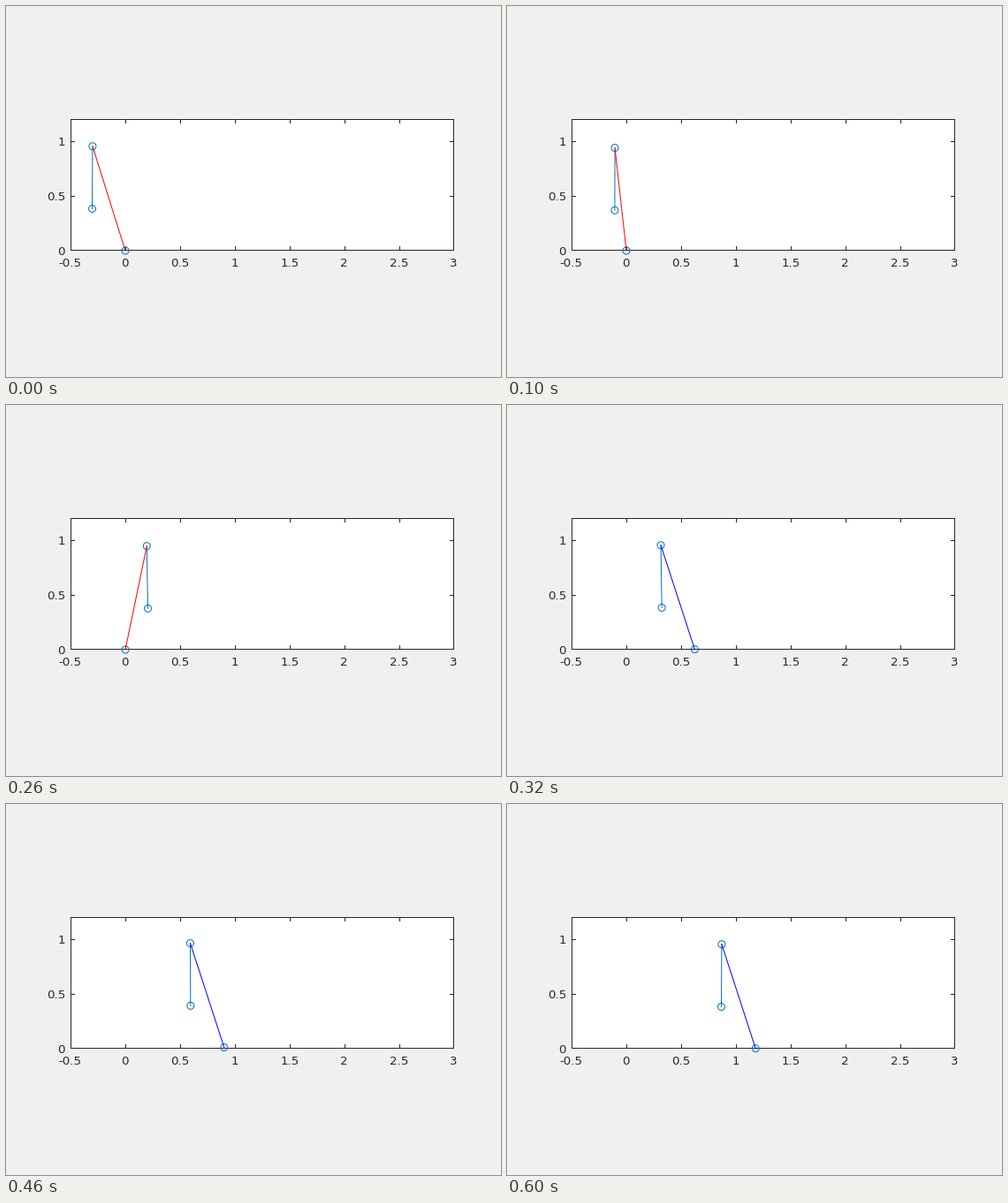
Recreate the animation shown at these times as a matplotlib script. Size 560 by 420 pixels, loop 620 ms.

```python
import math
import matplotlib.pyplot as plt
from matplotlib.animation import FuncAnimation
from matplotlib.patches import Circle

W, H, DPI = 560, 420, 100
PX = 72 / DPI                      # points per pixel
FRAMES, STEP_MS = 31, 20

# Whole numbers: straight strokes snap to the centre of that pixel.
LEFT, RIGHT, TOP, BOTTOM = 73, 506, 128, 276
TICK = 4
INK = "#262626"
STEEL = (0, 0.447, 0.741)

X0, Y0, UNIT = 135.0, 277.0, 124   # ground contact point, pixels per unit
LIFTOFF, MID, APEX = 15.6, 7.8, 22.8
LIFT_X, LIFT_Y = 37.07, 118.2
FOOT_DX, FOOT_DY = 0.309 * UNIT, 0.951 * UNIT
BOB = 0.57 * UNIT
SWING_RATE = -0.112

fig = plt.figure(figsize=(W / DPI, H / DPI), dpi=DPI, facecolor="#f0f0f0")
ax = fig.add_axes([0, 0, 1, 1])
ax.set_xlim(0, W)
ax.set_ylim(H, 0)
ax.axis("off")


def stroke(xs, ys, color):
    return ax.plot(xs, ys, color=color, lw=PX, clip_on=False)[0]


def joint():
    return ax.add_patch(Circle((X0, Y0), 4, fill=False, ec=STEEL, lw=PX,
                               zorder=2))


def label(x, y, text, ha):
    ax.text(x, y, text, ha=ha, va="baseline", color=INK,
            family="DejaVu Sans", size=13.33 * PX)


def draw_axes():
    ax.fill([LEFT, RIGHT, RIGHT, LEFT], [TOP, TOP, BOTTOM, BOTTOM],
            color="white", lw=0)
    stroke([LEFT, RIGHT, RIGHT, LEFT, LEFT],
           [TOP, TOP, BOTTOM, BOTTOM, TOP], INK)
    for i in range(8):
        x = min(LEFT + i * UNIT / 2, RIGHT)
        stroke([x, x], [BOTTOM, BOTTOM - TICK], INK)
        stroke([x, x], [TOP, TOP + TICK], INK)
        label(x - 0.2, 295, f"{i / 2 - 0.5:g}", "center")
    for i in range(3):
        y = Y0 - i * UNIT / 2
        stroke([LEFT, LEFT + TICK], [min(y, BOTTOM)] * 2, INK)
        stroke([RIGHT, RIGHT - TICK], [min(y, BOTTOM)] * 2, INK)
        label(67, y + 5, f"{i / 2:g}", "right")


def hip(k):
    """Hip offset from the first contact point: right, up."""
    if k < LIFTOFF:
        s = k - MID
        u = s / MID
        dip = 1.1 * (1 - u * u) + 0.55 * (1 + math.cos(math.pi * u))
        return 4.6 * s + 0.0025 * s ** 3, LIFT_Y - dip
    return LIFT_X + 4.92 * (k - LIFTOFF), 119.35 - 0.023 * (k - APEX) ** 2


def swing(k):
    """Sideways offset of the hanging bob."""
    start, end = -0.4, 1.15
    if k >= LIFTOFF:
        return end + SWING_RATE * (k - LIFTOFF)
    u = k / LIFTOFF
    ease = u * u * (3 - 2 * u)
    bend = u * (1 - u) ** 2 + u * u * (u - 1)
    return start + (end - start) * ease + SWING_RATE * LIFTOFF * bend


draw_axes()
bob_line = stroke([], [], STEEL)
joints = [joint() for _ in range(3)]
leg = stroke([], [], "red")


def update(k):
    dx, dy = hip(k)
    hx, hy = X0 + dx, Y0 - dy
    if k < LIFTOFF:
        fx, fy, color = X0, Y0, "red"
    else:
        fx, fy, color = hx + FOOT_DX, hy + FOOT_DY, "blue"
    bx, by = hx + swing(k), hy + BOB
    leg.set_data([hx, fx], [hy, fy])
    leg.set_color(color)
    bob_line.set_data([hx, bx], [hy, by])
    for ring, spot in zip(joints, [(hx, hy), (fx, fy), (bx, by)]):
        ring.set_center(spot)
    return bob_line, *joints, leg


anim = FuncAnimation(fig, update, frames=FRAMES, interval=STEP_MS,
                     repeat=True, repeat_delay=0)
plt.show()
```
